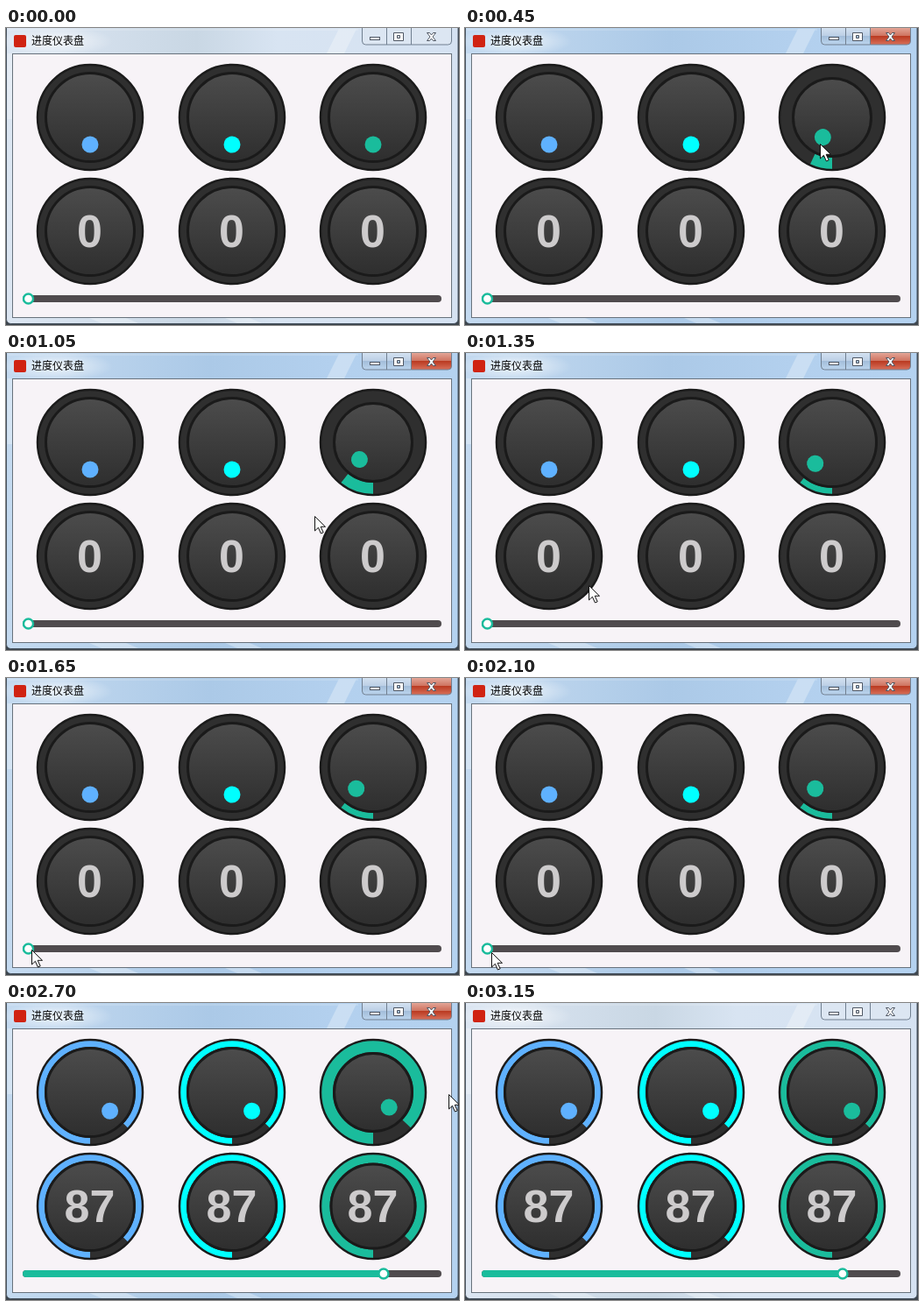
Animation, 517 px wide and 339 px high, one loop 3300 ms. Source, as an HTML page:

```html
<!DOCTYPE html>
<html lang="zh">
<head>
<meta charset="utf-8">
<style>
html, body { margin: 0; width: 100%; height: 100%; overflow: hidden; background: #3c444c; }
svg { display: block; }
.title { font: 12px "Noto Sans CJK SC", "Noto Sans CJK", sans-serif; }
.value { font: bold 52px "Liberation Sans", Arial, sans-serif; fill: #cdcbcc; text-anchor: middle; }
</style>
</head>
<body>
<svg id="stage" width="517" height="339" viewBox="0 0 517 339">
  <defs>
    <linearGradient id="face" x2="0" y2="1"><stop stop-color="#4c4c4c"/><stop offset="1" stop-color="#2e2e2e"/></linearGradient>
    <linearGradient id="idle"><stop stop-color="#dce6f2"/><stop offset=".2" stop-color="#d3dfec"/><stop offset=".42" stop-color="#c9d7e4"/><stop offset=".6" stop-color="#d8e4f2"/><stop offset="1" stop-color="#d5e2f2"/></linearGradient>
    <linearGradient id="live"><stop stop-color="#c4daf0"/><stop offset=".2" stop-color="#bad3ec"/><stop offset=".45" stop-color="#abc9e7"/><stop offset=".72" stop-color="#b3d0ee"/><stop offset="1" stop-color="#b4d2f0"/></linearGradient>
    <linearGradient id="red" x2="0" y2="1"><stop stop-color="#e5aa9c"/><stop offset=".48" stop-color="#cf7562"/><stop offset=".5" stop-color="#b9381f"/><stop offset="1" stop-color="#d8705a"/></linearGradient>
    <linearGradient id="blue" x2="0" y2="1"><stop stop-color="#d5e3f2"/><stop offset=".48" stop-color="#bdd0e6"/><stop offset=".5" stop-color="#a3bdd9"/><stop offset="1" stop-color="#bcd5ee"/></linearGradient>
    <radialGradient id="glow"><stop stop-color="#fff" stop-opacity=".75"/><stop offset="1" stop-color="#fff" stop-opacity="0"/></radialGradient>
  </defs>
  <rect id="chrome" x=".5" y="-5" width="515.5" height="342.5" rx="5" stroke="#46525e"/>
  <g fill="#fff" opacity=".3">
    <path d="M95 331h42l14 6h-42zM250 331h28l14 6h-28zM1.5 29h5.500v75h-5.500zM380 1h20l-14 28h-20z"/>
    <path d="M2 1.500h400v1H2z"/>
  </g>
  <ellipse cx="58" cy="15" rx="64" ry="17" fill="url(#glow)"/>
  <rect x="7.500" y="29.500" width="501" height="301" fill="#f7f3f7" stroke="#68727c"/>
  <rect x="9" y="8" width="14" height="14" rx="2" fill="#d02312"/>
  <text class="title" x="29" y="19">进度仪表盘</text>
  <g id="buttons" stroke="#707f90">
    <path id="plain" d="M406.500 -1V15q0 4 4 4H462.500V-1z"/>
    <path id="close" d="M462.500 -1V19H504.500q4 0 4-4V-1z"/>
    <path d="M434.500 0V19"/>
    <g fill="#fff" stroke="#4e5663">
      <rect x="415.500" y="10.500" width="11" height="3"/>
      <path fill-rule="evenodd" d="M442.500 5.500h11v9h-11zM446.500 8.500h3v3h-3z"/>
      <path d="M480.500 5.500h3l2 2.500 2-2.500h3l-3.500 4.500 3.500 4.500h-3l-2-2.500-2 2.500h-3l3.500-4.500z"/>
    </g>
  </g>
  <g id="dials"></g>
  <rect x="19" y="305" width="478" height="8" rx="4" fill="#504b4e"/>
  <rect id="fill" x="19" y="305" height="8" rx="4" fill="#1abc9c"/>
  <circle id="knob" cy="309" r="5.500" fill="#fff" stroke="#1abc9c" stroke-width="2.400"/>
  <path id="cursor" d="M.5 .5V17l3.900-3.700 3 6.700 2.800-1.200-3-6.500h5.300z" fill="#fff" stroke="#111"/>
</svg>
<script>
const LOOP = 3300, STEP = 150;
const $ = id => document.getElementById(id);

function add(parent, tag, attrs) {
  const el = document.createElementNS('http://www.w3.org/2000/svg', tag);
  set(el, attrs);
  return parent.appendChild(el);
}
function set(el, attrs) {
  for (const key in attrs) el.setAttribute(key, attrs[key]);
}

// Linear interpolation through [time, ...values] keys, held at both ends.
function track(keys, t) {
  const i = keys.findIndex(k => k[0] >= t);
  if (i < 0) return keys[keys.length - 1].slice(1);
  if (i === 0) return keys[0].slice(1);
  const a = keys[i - 1], b = keys[i], f = (t - a[0]) / (b[0] - a[0]);
  return a.slice(1).map((v, j) => v + (b[j + 1] - v) * f);
}

const pointer = [[150, 417, 126], [300, 417, 131], [450, 405, 132], [600, 397, 130],
  [900, 396, 132], [1050, 352, 186], [1500, 35, 304], [1650, 29, 310], [2100, 30, 313],
  [2400, 434, 312], [2550, 440, 140], [2700, 505, 104]];
const slider = [[2100, 0], [2250, 40], [2400, 87]];
const dragged = [[300, 0], [450, 7], [600, 10.7]];
const hoverTop = [[0, 0], [150, 2], [300, 5], [450, 6], [1050, 6], [1200, 3], [1350, 0],
  [2400, 0], [2550, 4], [2700, 6], [2850, 3], [3000, 0]];
const hoverLow = [[2400, 0], [2550, 5], [2700, 2.5], [2850, 0]];

const colors = ['#5fb1ff', '#00ffff', '#1abc9c'];

function makeDial(index) {
  const column = index % 3, low = index > 2, color = colors[column];
  const g = add($('dials'), 'g', { transform: `translate(${[96, 258, 419][column]} ${low ? 232 : 102})` });
  add(g, 'circle', { r: 60, fill: '#2f2f2f', stroke: '#1b1b1b', 'stroke-width': 2.5 });
  const arc = add(g, 'circle', { fill: 'none', stroke: color, pathLength: 100, transform: 'rotate(90)' });
  const face = add(g, 'circle', { fill: 'url(#face)', stroke: '#1a1a1a', 'stroke-width': 3 });
  const mark = low
    ? add(g, 'text', { class: 'value', x: -0.5, y: 18 })
    : add(g, 'circle', { r: 9.5, fill: color });

  return (percent, shrink) => {
    const inner = 52 - shrink, outer = 58.7;
    set(arc, {
      r: (inner + outer) / 2,
      'stroke-width': outer - inner,
      'stroke-dasharray': `${percent} 100`,
      visibility: percent > 0 ? 'visible' : 'hidden'
    });
    set(face, { r: 50.5 - shrink });
    if (low) mark.textContent = Math.round(percent);
    else set(mark, { cy: 31 - shrink, transform: `rotate(${percent * 3.6})` });
  };
}
const dials = Array.from({ length: 6 }, (_, i) => makeDial(i));

function draw(t) {
  const active = t >= 450 && t < 3150;
  set($('chrome'), { fill: active ? 'url(#live)' : 'url(#idle)' });
  set($('plain'), { fill: active ? 'url(#blue)' : '#dce6f2' });
  set($('close'), { fill: active ? 'url(#red)' : '#dce6f2' });

  const [percent] = track(slider, t);
  const [top] = track(hoverTop, t), [bottom] = track(hoverLow, t);
  dials.forEach((update, i) => {
    const value = i === 2 && t < 2250 ? track(dragged, t)[0] : percent;
    update(value, i === 2 ? top : i === 5 ? bottom : 0);
  });

  const x = 25.5 + 4.66 * percent;
  set($('knob'), { cx: x });
  set($('fill'), { width: x - 19 });
  set($('cursor'), {
    transform: `translate(${track(pointer, t).map(Math.round)})`,
    visibility: t >= 150 && t < 2850 ? 'visible' : 'hidden'
  });
}

const start = performance.now();
function tick() {
  const t = (performance.now() - start) % LOOP;
  draw(Math.floor(t / STEP) * STEP);
  requestAnimationFrame(tick);
}
tick();
</script>
</body>
</html>
```
